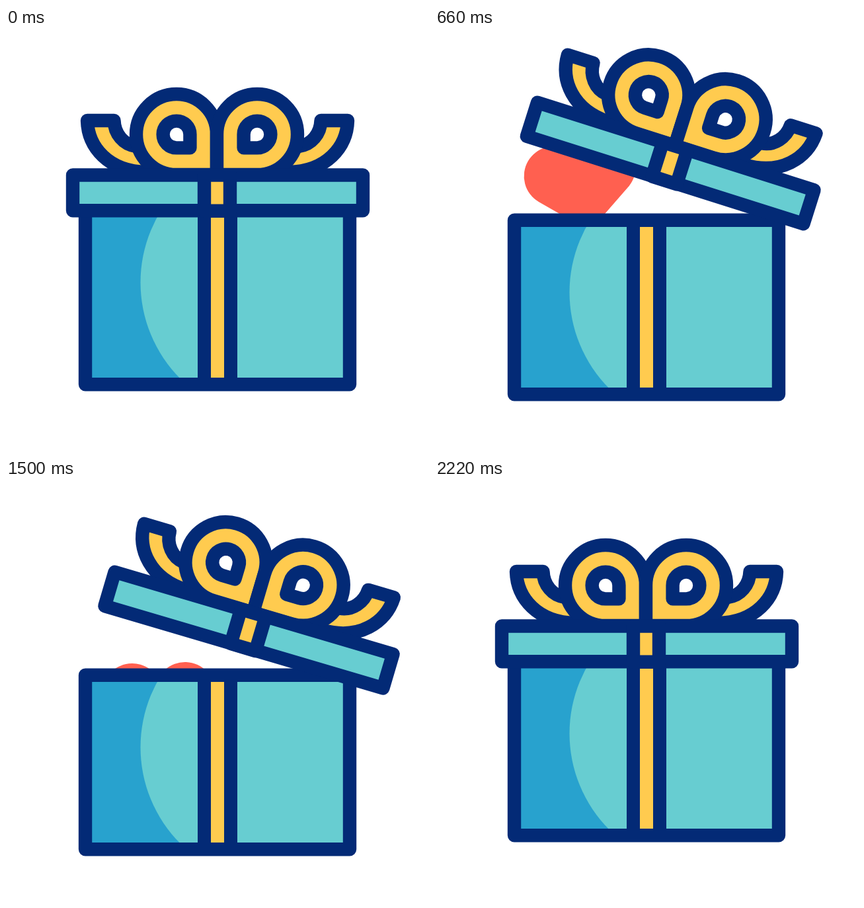
These frames come from a looping animation (640x640 px, 2280 ms). An HTML page with a canvas:

```html
<!DOCTYPE html>
<html lang="en">
<head>
<meta charset="utf-8">
<title>Gift box</title>
<style>
  html, body { margin: 0; width: 100%; height: 100%; overflow: hidden; background: #fff; }
  canvas { display: block; width: 100%; height: 100%; }
</style>
</head>
<body>
<canvas id="stage" width="640" height="640"></canvas>
<script>
const ctx = document.getElementById('stage').getContext('2d');
const LOOP = 2280;
const NAVY = '#032a76', TEAL = '#67cdd1', BLUE = '#28a2ce', GOLD = '#ffcb4f', RED = '#ff6050';

const ramp = (t, from, to) => Math.min(1, Math.max(0, (t - from) / (to - from)));
const sine = u => (1 - Math.cos(Math.PI * u)) / 2;
const ease = (t, from, to) => sine(ramp(t, from, to));

function place(x, y, deg, draw) {
  ctx.save();
  ctx.translate(x, y);
  ctx.rotate(deg * Math.PI / 180);
  draw();
  ctx.restore();
}

function mirror(axis, draw) {
  draw();
  ctx.save();
  ctx.translate(2 * axis, 0);
  ctx.scale(-1, 1);
  draw();
  ctx.restore();
}

function paint(fill) {
  ctx.fillStyle = fill;
  ctx.fill();
  ctx.stroke();
}

function bar(x, y, w, h, fill) {
  ctx.beginPath();
  ctx.rect(x, y, w, h);
  paint(fill);
}

function strip(x, y, w, h, fill) {
  ctx.fillStyle = fill;
  ctx.fillRect(x, y, w, h);
}

function drop(r, fill) {
  ctx.beginPath();
  ctx.arc(258, 161, r, 0, Math.PI / 2, true);
  ctx.lineTo(258 + r, 161 + r);
  ctx.closePath();
  paint(fill);
}

function loop() {
  drop(61, GOLD);
  drop(20.4, '#fff');
}

// The inner end stays open and is covered by the loop
function tail() {
  ctx.beginPath();
  ctx.moveTo(197, 179);
  ctx.bezierCurveTo(178, 177, 164, 160, 163.5, 140);
  ctx.lineTo(123, 140);
  ctx.bezierCurveTo(124, 180, 155, 217, 212, 218);
  paint(GOLD);
}

function lid() {
  ctx.translate(-540, -256);
  mirror(320, tail);
  mirror(319, loop);
  bar(101, 222.5, 439, 53.7, TEAL);
  bar(300, 222.5, 39, 54.3, GOLD);
}

function box() {
  ctx.save();
  ctx.beginPath();
  ctx.rect(120, 275.8, 400, 263.5);
  ctx.clip();
  ctx.fillStyle = BLUE;
  ctx.fill();
  ctx.beginPath();
  ctx.arc(409.5, 385, 206, 0, 2 * Math.PI);
  ctx.fillStyle = TEAL;
  ctx.fill();
  ctx.restore();
  strip(290, 275.8, 60, 263.5, NAVY);
  strip(310, 275.8, 20, 263.5, GOLD);
  bar(120, 275.8, 400, 263.5, 'transparent');
}

function heart() {
  const side = 130 * Math.PI / 180, top = Math.asin(0.75);
  ctx.beginPath();
  ctx.arc(-40, 0, 45, side, 2 * Math.PI - top);
  ctx.lineTo(0, -26);
  ctx.arc(40, 0, 45, Math.PI + top, 3 * Math.PI - side);
  ctx.lineTo(0, 91);
  ctx.closePath();
  ctx.fillStyle = RED;
  ctx.fill();
}

function frame(t) {
  // Box: quick jump, slow landing lower down, then back to rest
  const dy = -26 * ease(t, 220, 300) + 48 * ease(t, 300, 780) - 22 * ease(t, 1450, 1805);
  // Lid: turns about its right end, hops, then slides off the edge
  const swing = sine(ramp(t, 220, 860) ** 0.835) - ease(t, 1360, 1810);
  const slide = ease(t, 480, 820) - ease(t, 1390, 1810);
  const hop = Math.sin(Math.PI * ramp(t, 220, 760));
  // Heart: leans more the higher it rises
  const rise = ease(t, 220, 705) - ease(t, 1340, 1617);
  const lean = rise * rise;

  ctx.fillStyle = '#fff';
  ctx.fillRect(0, 0, 640, 640);
  ctx.strokeStyle = NAVY;
  ctx.lineWidth = 20.4;
  ctx.lineJoin = 'round';
  place(233 - 14.5 * lean, 365 + dy - 166 * rise, -10 * lean, heart);
  place(0, dy, 0, box);
  place(540 + 43 * slide, 256 + dy - 12.8 * hop + 24 * slide, 21.1 * swing, lid);
}

let start;
function tick(now) {
  start ??= now;
  frame((now - start) % LOOP);
  requestAnimationFrame(tick);
}
frame(0);
requestAnimationFrame(tick);
</script>
</body>
</html>
```
